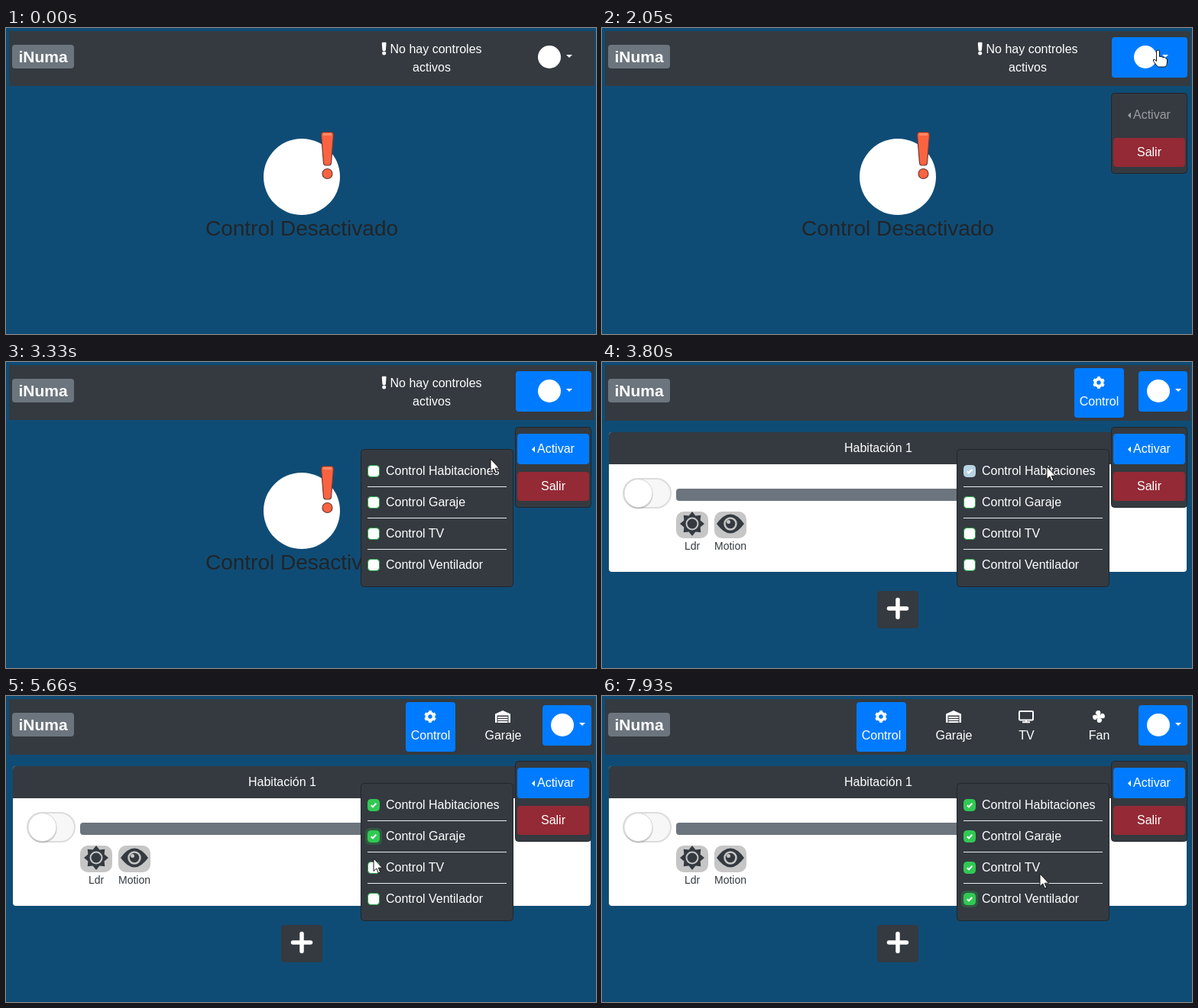
These frames come from a looping animation (772x401 px, 8 s). An HTML page:

```html
<!DOCTYPE html>
<html lang="es">
<head>
<meta charset="utf-8">
<title>Control de casa</title>
<style>
  html, body { margin: 0; width: 100%; height: 100%; overflow: hidden; background: #0f4c75; }
  svg { display: block; width: 772px; height: 401px; }
  text { font: 16px "Liberation Sans", Arial, sans-serif; fill: #fff; }
  .mid { text-anchor: middle; }
  .dark { fill: #343a40; }
  .blue { fill: #007bff; }
  .white { fill: #fff; }
  .small { font-size: 14px; fill: #343a40; }
  .panel { fill: #343a40; stroke: #20262b; }
</style>
</head>
<body>
<svg viewBox="0 0 772 401">
  <rect id="bar" class="dark" x="4" y="4" width="766" height="72"/>
  <rect x="8" y="22" width="81" height="31" rx="4" fill="#6c757d"/>
  <text x="16.4" y="45" style="font-size:21px;font-weight:bold">iNuma</text>

  <g id="intro">
    <path class="white" d="M491.8 20q0-1.200 1.200-1.200h3.400q1.200 0 1.200 1.200l-.7 9q-.1 1-1 1h-2.400q-.9 0-1-1z"/>
    <circle class="white" cx="494.700" cy="33" r="2.500"/>
    <text x="502.500" y="33">No hay controles</text>
    <text class="mid" x="557" y="57">activos</text>
    <circle class="white" cx="387" cy="195" r="50"/>
    <g fill="#fb6340" stroke="#6b3a38" stroke-width="1.200">
      <path d="M412.500 140q0-3.500 3.500-3.500h9q3.500 0 3.500 3.500l-3 37q-.4 3-3 3h-4q-2.600 0-3-3z"/>
      <circle cx="420.500" cy="191" r="6.500"/>
    </g>
    <path d="M415 139.500h11" stroke="#ff8a63" stroke-width="3"/>
    <text class="mid" x="387" y="272" style="font-size:28px;fill:#212529">Control Desactivado</text>
  </g>

  <g id="room">
    <rect class="white" x="9" y="92" width="756" height="183" rx="4"/>
    <path class="dark" d="M9 134V96q0-4 4-4h748q4 0 4 4v38z"/>
    <text class="mid" x="361.500" y="118">Habitación 1</text>
    <rect x="28" y="153" width="62" height="38" rx="19" fill="#f7f7f7" stroke="#dcdcdc" stroke-width="2"/>
    <circle cx="48" cy="174" r="18.500" fill="#000" opacity=".18"/>
    <circle class="white" cx="47.500" cy="172" r="18.500" stroke="#d4d4d4"/>
    <rect x="97" y="166" width="520" height="16" rx="4" fill="#6c757d"/>
    <rect x="97" y="196" width="42" height="35" rx="10" fill="#c6c6c6"/>
    <rect x="147" y="196" width="42" height="35" rx="10" fill="#c6c6c6"/>
    <polygon id="sun" class="dark" transform="translate(118 212)"/>
    <circle cx="118" cy="212" r="7.500" fill="#343a40" stroke="#c6c6c6" stroke-width="2"/>
    <path class="dark" d="M150 212Q168 187 186 212Q168 237 150 212z"/>
    <circle cx="168" cy="212" r="7.500" fill="#343a40" stroke="#c6c6c6" stroke-width="2.500"/>
    <circle cx="165.500" cy="209.500" r="2.500" fill="#c6c6c6"/>
    <text class="mid small" x="118" y="246">Ldr</text>
    <text class="mid small" x="168" y="246">Motion</text>
    <rect class="dark" x="360" y="300" width="54" height="49" rx="4"/>
    <path d="M375.500 323h23M387 311.500v23" stroke="#fff" stroke-width="5.500" stroke-linecap="round"/>
  </g>

  <g id="tabs"></g>

  <rect id="userBox" class="blue" y="12" height="53" rx="4"/>
  <g id="user">
    <circle class="white" cx="711" cy="38" r="15"/>
    <path class="white" d="M733 35h8l-4 4z"/>
  </g>

  <g id="menu">
    <rect class="panel" x="666.500" y="85.500" width="99" height="105" rx="4"/>
    <rect id="actBox" class="blue" x="669" y="94" width="94" height="40" rx="4"/>
    <g id="act">
      <path class="white" d="M692 110.500v8l-4-4z"/>
      <text x="695" y="119">Activar</text>
    </g>
    <rect x="669" y="144" width="94" height="38" rx="4" fill="#942a35"/>
    <text class="mid" x="716" y="168">Salir</text>
  </g>

  <g id="sub">
    <rect class="panel" x="464.500" y="114.500" width="199" height="180" rx="4"/>
    <path d="M473 163.500h182m-182 41h182m-182 41h182" stroke="#e9ecef"/>
    <g id="rows"></g>
  </g>

  <g id="cursor">
    <circle id="halo" r="12" fill="#b4b419" opacity=".8"/>
    <path id="arrow" d="M0 0V16.500L3.800 13 6.400 19 8.800 18 6.200 12.200H11.500Z" fill="#fff" stroke="#111" stroke-width="1"/>
    <path id="hand" transform="translate(1.500 1)" fill="#fff" stroke="#111"
      d="M-2 2Q-2 0 0 0Q2 0 2 2V8.500Q5 7.500 6 9.500Q9 8.500 9.500 10.500Q12 10 12 13V16Q12 20 9.500 22H0Q-2 20-6 14.500Q-7 11.500-4 12.500L-2 14.500Z"/>
  </g>
</svg>
<script>
const LOOP = 8000;
const $ = id => document.getElementById(id);
const show = (id, on) => { $(id).style.display = on ? '' : 'none'; };
const clamp = v => Math.max(0, Math.min(1, v));

// cursor stops: time, x, y
const PATH = [
  [780, 772, 316], [980, 757, 205], [1180, 738, 88], [1380, 726, 28],
  [2320, 726, 28], [2720, 727, 108], [3100, 727, 108], [3460, 582, 137],
  [3860, 582, 137], [4330, 495, 186], [4859, 495, 186], [4860, 496, 193],
  [5130, 496, 193], [5660, 481, 213], [5700, 481, 213], [5930, 481, 226],
  [6330, 481, 226], [6460, 482, 240], [6860, 487, 269], [7859, 487, 269],
  [7860, 530, 251], [7920, 573, 233], [LOOP, 573, 233]
];
const PRESSES = [[1650, 1850], [2850, 2990], [3660, 3730], [4530, 4860], [6130, 6260], [7000, 7130]];
const CHECKS = [3730, 4930, 6260, 7130];
const BLURS = [4530, 6130, 7000, LOOP + 1000];
const TAB_TIMES = [3730, 5000, 6260, 7130];
const MENU_AT = 1900, SUB_AT = 3000;

const icons = [
  '<circle r="4.600" fill="none" stroke="#fff" stroke-width="3.800"/><circle r="6.700" fill="none" stroke="#fff" stroke-width="2.400" stroke-dasharray="3.700 3.316" transform="rotate(14)"/>',
  '<path class="white" d="M-10-3.500L0-8 10-3.500V8H7.500V-1.500h-15V8H-10z"/><path d="M-6.500 1h13m-13 3h13m-13 3h13" stroke="#fff" stroke-width="2"/>',
  '<rect x="-9" y="-7" width="18" height="11.500" rx="1" fill="none" stroke="#fff" stroke-width="2"/><path d="M0 4v3M-5 7.200H5" stroke="#fff" stroke-width="2"/>',
  [0, 90, 180, 270].map(a => `<path class="white" transform="rotate(${a})" d="M0 1C-1-2-3-2.500-4-3.500C-5-8 0-8.500 1.500-7.500C3-5.500 2.500-2 0 1z"/>`).join('')
];

$('tabs').innerHTML = ['Control', 'Garaje', 'TV', 'Fan'].map((name, i) => `<g>
  ${i ? '' : '<rect class="blue" x="-32.500" y="8" width="65" height="65" rx="4"/>'}
  <g transform="translate(-.5 27)">${icons[i]}</g>
  <text class="mid" x="0" y="57">${name}</text></g>`).join('');

$('rows').innerHTML = ['Habitaciones', 'Garaje', 'TV', 'Ventilador'].map((name, i) => `
  <g transform="translate(473 ${135 + 41 * i})">
    <rect class="ring" x="-3" y="-3" width="22" height="22" rx="6" fill="#28a745" fill-opacity=".3"/>
    <rect class="box" x=".5" y=".5" width="15" height="15" rx="4"/>
    <path class="tick" d="M4.800 8.200l2.200 2.200 4.300-4.600" fill="none" stroke="#fff" stroke-width="2"/>
    <text x="24" y="13">Control ${name}</text>
  </g>`).join('');

$('sun').setAttribute('points', Array.from({ length: 16 }, (_, k) => {
  const r = k % 2 ? 11.5 : 16, a = k * Math.PI / 8;
  return [r * Math.cos(a), r * Math.sin(a)].map(v => v.toFixed(2)).join();
}).join(' '));

function cursorAt(t) {
  const k = Math.max(1, PATH.findIndex(p => p[0] > t));
  const [t0, x0, y0] = PATH[k - 1], [t1, x1, y1] = PATH[k];
  const f = clamp((t - t0) / (t1 - t0));
  return [Math.round(x0 + (x1 - x0) * f), Math.round(y0 + (y1 - y0) * f)];
}

const LIGHT = [184, 211, 226], GREEN = [49, 201, 83];
const mix = f => `rgb(${LIGHT.map((c, i) => Math.round(c + (GREEN[i] - c) * f))})`;

function drawRow(row, i, t) {
  const age = t - CHECKS[i], on = age >= 0;
  const color = mix(clamp((age - 90) / 150));
  const box = row.querySelector('.box');
  box.setAttribute('fill', on ? color : '#fff');
  box.setAttribute('stroke', on ? color : '#28a745');
  row.querySelector('.tick').style.display = on ? '' : 'none';
  row.querySelector('.ring').style.opacity = clamp((age - 90) / 150) * (1 - clamp((t - BLURS[i]) / 130));
}

function render(t) {
  const stage = TAB_TIMES.filter(s => t >= s).length;
  show('intro', !stage);
  show('room', stage);
  $('bar').setAttribute('height', stage ? 73 : 72);
  [...$('tabs').children].forEach((tab, i) => {
    tab.style.display = i < stage ? '' : 'none';
    tab.setAttribute('transform', `translate(${650.5 - 95 * (stage - 1 - i)} 0)`);
  });

  show('userBox', t >= 1850);
  $('userBox').setAttribute('x', stage ? 702 : 667);
  $('userBox').setAttribute('width', stage ? 64 : 99);
  $('user').setAttribute('transform', `translate(${stage ? 17 : 0} 0)`);

  const [x, y] = cursorAt(t);
  const onUser = x > 667 && y < 65;
  const onAct = t >= MENU_AT && x > 669 && y >= 94 && y < 134;
  show('menu', t >= MENU_AT);
  show('actBox', t >= SUB_AT);
  $('act').style.opacity = t >= SUB_AT ? 1 : onAct ? .7 : .5;
  show('sub', t >= SUB_AT);
  [...$('rows').children].forEach((row, i) => drawRow(row, i, t));

  show('cursor', t >= 780);
  $('cursor').setAttribute('transform', `translate(${x} ${y})`);
  show('hand', onUser || onAct);
  show('arrow', !(onUser || onAct));
  show('halo', PRESSES.some(([a, b]) => t >= a && t < b));
}

const start = performance.now();
function tick() {
  render((performance.now() - start) % LOOP);
  requestAnimationFrame(tick);
}
tick();
</script>
</body>
</html>
```
